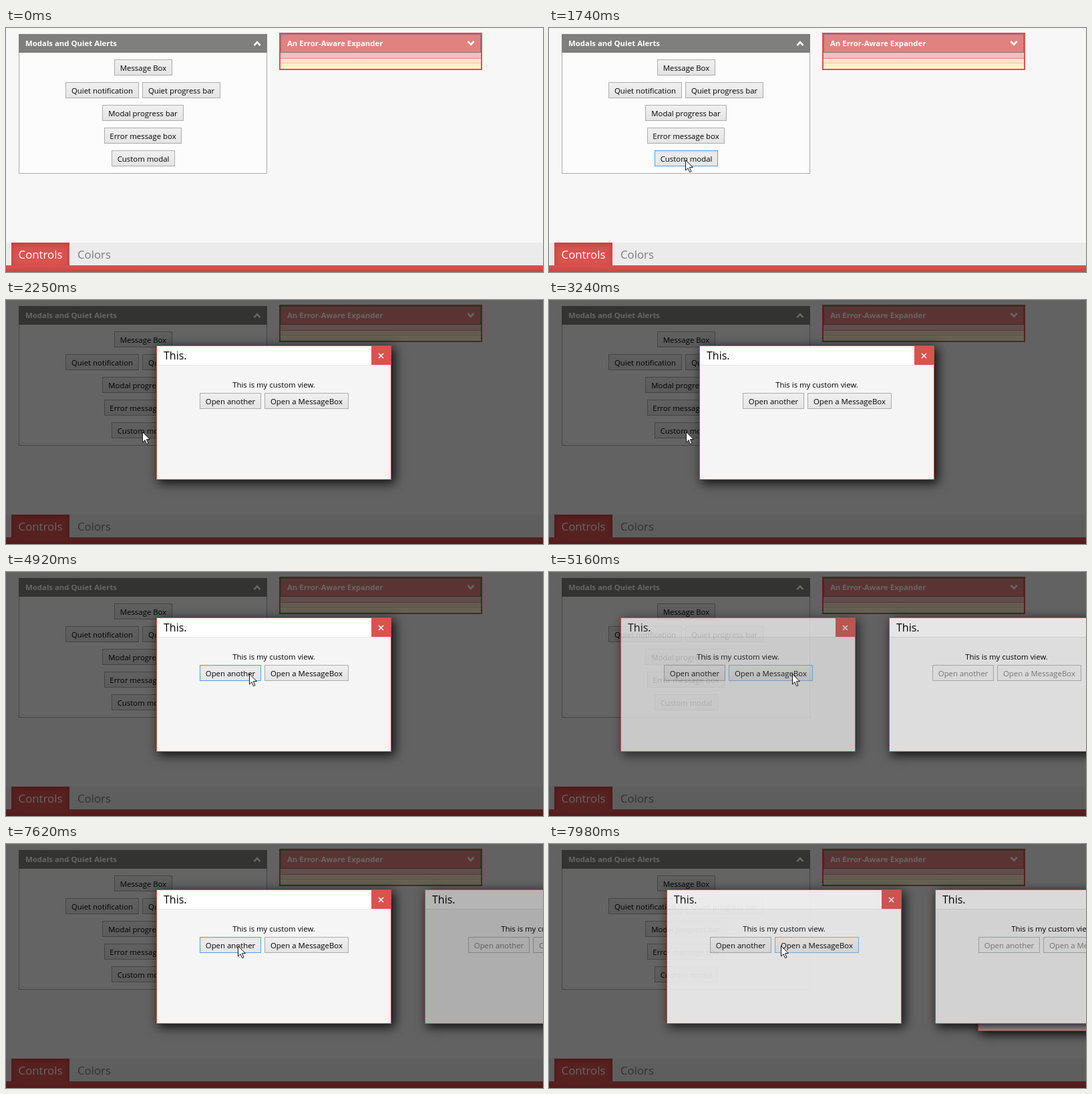
These frames come from a looping animation (804 by 365 pixels, 8 s). An HTML page:

```html
<!DOCTYPE html>
<html lang="en">
<head>
<meta charset="utf-8">
<title>Modal stack</title>
<style>
html, body { margin: 0; width: 804px; height: 365px; overflow: hidden; }
body { position: relative; background: #f7f7f7; font: 11.4px "Open Sans", "Noto Sans", sans-serif; color: #000; }
div, svg { position: absolute; box-sizing: border-box; white-space: nowrap; }
.head { left: 0; top: 0; height: 28px; width: 100%; padding-left: 10px; line-height: 28px; font-weight: 700; color: #fff; }
.panel { left: 19px; top: 9px; width: 372px; height: 209px; background: #fcfcfc; border: 1px solid #acacac; }
.panel .head { left: -1px; top: -1px; width: 372px; background: #7f7f7e; }
.aware { left: 409px; top: 7px; width: 304px; height: 56px; border: 2px solid #d9534f; background: #fff0d0; }
.aware .head { background: #e1827f; border: 1px solid #8c7370; padding-left: 9px; line-height: 26px; }
.row { left: 0; width: 100%; }
.btn { height: 24px; line-height: 23px; text-align: center; border: 1px solid #acacac; background: linear-gradient(#f0f0f0, #e4e4e4); }
.btn.hover { border-color: #7eb4ea; }
.btn.press { border-color: #569de5; background: linear-gradient(#e0e4e8, #ececec 25%, #e6e6e6); }
.off .btn { border-color: #b4b7b9; background: #f2f2f2; color: #838383; }
.strip { left: 0; top: 321px; width: 804px; height: 34px; background: #ebebeb; font-size: 16.8px; line-height: 35px; color: #7b7b7b; }
.tab { left: 8px; top: 0; width: 87px; height: 34px; background: #d9534f; color: #fff; text-align: center; box-shadow: inset 0 3px 8px #bd3f3c; }
.bar { left: 0; top: 355px; width: 804px; height: 10px; background: linear-gradient(#d9534f, #c94743); }
.scrim { left: 0; top: 0; width: 804px; height: 365px; background: #000; }
.modal { left: 0; top: 0; width: 352px; height: 201px; background: #f5f5f5; border: 1px solid #dc4640; box-shadow: 4px 4px 15px 1px rgba(0,0,0,.85); }
.title { left: 0; top: 0; width: 350px; height: 29px; padding-left: 10px; background: #fff; border-bottom: 1px solid #e4e4e4; font-size: 16px; line-height: 29px; }
.close { left: 321px; top: 0; width: 29px; height: 28px; background: #d9534f; }
.msg { left: 0; top: 50px; width: 350px; line-height: 16px; text-align: center; }
.dim { inset: 0; background: #000; }
</style>
</head>
<body>
<script>
const LOOP = 8000, STEP = 30, SLIDE = 357;
const CENTER = 225, SHIFT = 402, TOP = 68;
const OPENED = [1868, 5040, 7800];

function add(parent, cls, text = '', css = {}) {
  const el = document.createElement('div');
  el.className = cls;
  el.textContent = text;
  Object.assign(el.style, css);
  return parent.appendChild(el);
}

function button(parent, text, x, y, w) {
  return add(parent, 'btn', text, { left: x + 'px', top: y + 'px', width: w + 'px' });
}

function drawing(parent, x, y, w, h, inner) {
  parent.insertAdjacentHTML('beforeend',
    `<svg width="${w}" height="${h}" style="left:${x}px;top:${y}px">${inner}</svg>`);
  return parent.lastElementChild;
}

const stroke = (d, w) => `<path d="${d}" fill="none" stroke="#fff" stroke-width="${w}"/>`;

function buildPage() {
  const page = document.body;
  add(add(page, 'panel'), 'head', 'Modals and Quiet Alerts');
  const aware = add(page, 'aware');
  add(aware, 'head', 'An Error-Aware Expander');
  [[28, 8, '#f1c0c0'], [36, 1, '#e1827f'], [37, 6, '#fde6d2'], [43, 1, '#f6c87c']].forEach(([y, h, c]) =>
    add(aware, 'row', '', { top: y + 'px', height: h + 'px', background: c }));
  drawing(page, 370, 18, 12, 10, stroke('M1.5 8 6 3.2 10.5 8', 2.6));
  drawing(page, 690, 18, 12, 10, stroke('M1.5 2 6 6.8 10.5 2', 2.6));

  button(page, 'Message Box', 162, 47, 87);
  button(page, 'Quiet notification', 89, 81, 110);
  button(page, 'Quiet progress bar', 204, 81, 117);
  button(page, 'Modal progress bar', 144, 115, 122);
  button(page, 'Error message box', 147, 149, 116);
  const custom = button(page, 'Custom modal', 158, 183, 95);

  const strip = add(page, 'strip');
  add(strip, 'tab', 'Controls');
  add(strip, '', 'Colors', { left: '107px' });
  add(page, 'bar');
  return custom;
}

function buildModal() {
  const box = add(document.body, 'modal');
  add(box, 'title', 'This.');
  drawing(add(box, 'close'), 10, 10, 9, 9, stroke('M1 1 8 8M8 1 1 8', 1.5));
  add(box, 'msg', 'This is my custom view.');
  const another = button(box, 'Open another', 64, 70, 92);
  const message = button(box, 'Open a MessageBox', 161, 70, 126);
  return { box, another, message, dim: add(box, 'dim') };
}

const custom = buildPage();
const scrim = add(document.body, 'scrim');
const modals = OPENED.map(buildModal);
const pointer = drawing(document.body, 0, 0, 13, 20,
  '<path d="M.5.5V16L4 12.6 6.6 18.6 9 17.5 6.4 11.6H11.4Z" fill="#fff" stroke="#111"/>');

// time, x, y of the pointer
const PATH = [
  [360, 213, 366], [1140, 204, 197], [3210, 204, 197], [4020, 359, 155],
  [4110, 364, 152], [6840, 364, 152], [7110, 347, 152], [LOOP, 347, 152]
];

function pointerAt(t) {
  if (t <= PATH[0][0]) return [213, 380];
  const i = PATH.findIndex(p => p[0] >= t);
  const [t0, x0, y0] = PATH[i - 1], [t1, x1, y1] = PATH[i];
  const k = (t - t0) / (t1 - t0), s = k * k * (3 - 2 * k);
  return [Math.round(x0 + (x1 - x0) * s), Math.round(y0 + (y1 - y0) * s)];
}

const progress = (t, start) => Math.min(1, Math.max(0, (t - start) / SLIDE));
const ease = k => 1 - (1 - k) ** 3;
const between = (t, a, b) => t >= a && t < b;

function mark(el, hover, press) {
  el.classList.toggle('hover', hover);
  el.classList.toggle('press', press);
}

function render(time) {
  const t = Math.floor(time / STEP) * STEP;
  const [px, py] = pointerAt(t);
  const over = (x, y, w) => px >= x && px < x + w && py >= y && py < y + 24;
  const steps = OPENED.map(start => progress(t, start));

  pointer.style.transform = `translate(${px}px, ${py}px)`;
  mark(custom, t < 1860 && over(158, 183, 95), between(t, 1740, 1860));
  scrim.style.opacity = 0.6 * steps[0];

  modals.forEach((m, i) => {
    const enter = ease(steps[i]);
    const push = steps[i + 1] || 0, deeper = ease(steps[i + 2] || 0);
    const x = Math.round(CENTER + SHIFT * (enter - 1 + ease(push)) + 17 * deeper);
    const y = Math.round(TOP + 12 * deeper);
    const active = enter > 0 && push === 0;
    m.box.style.transform = `translate(${x}px, ${y}px)`;
    m.box.style.opacity = enter;
    m.box.classList.toggle('off', push > 0);
    m.dim.style.opacity = 0.29 * push;
    const press = between(t, 4920, 5070) || between(t, 7620, 7830);
    mark(m.another, active && over(x + 65, y + 71, 92), active && press);
    mark(m.message, active && over(x + 162, y + 71, 126), false);
  });
}

const begin = performance.now();
function tick() {
  render((performance.now() - begin) % LOOP);
  requestAnimationFrame(tick);
}
tick();
</script>
</body>
</html>
```
